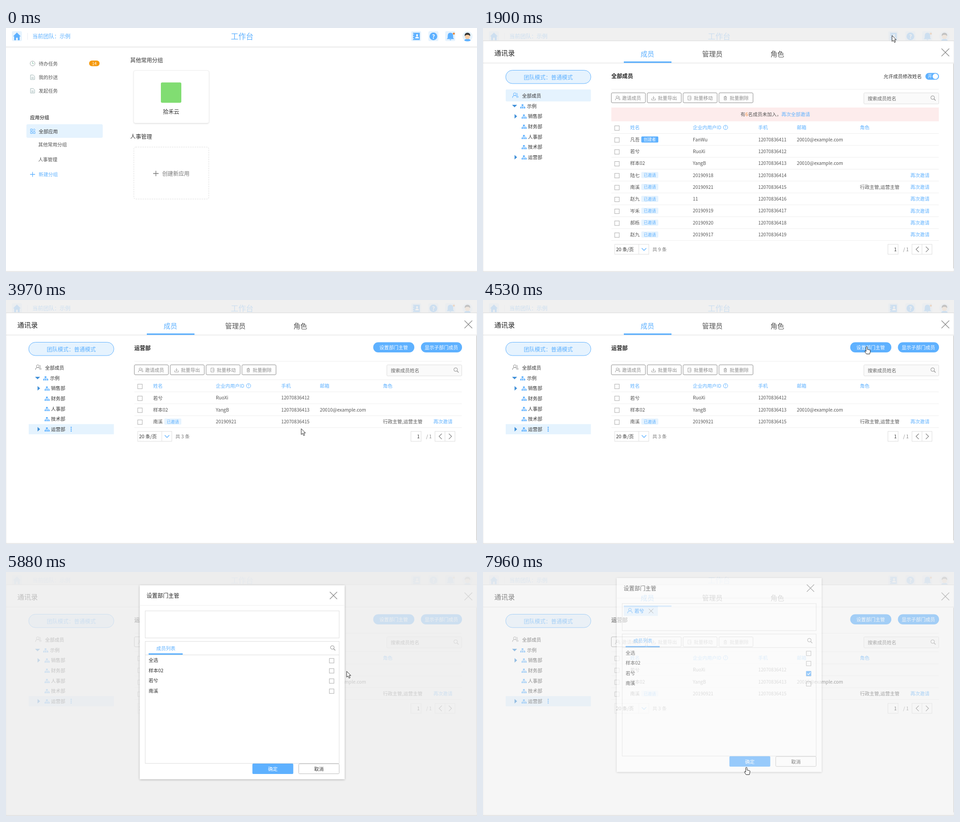
Animation of 1037x540 px, one loop 8 s. Source, as an HTML page:

```html
<!DOCTYPE html>
<html lang="zh-CN">
<head>
<meta charset="utf-8">
<style>
  html, body { margin: 0; width: 100%; height: 100%; overflow: hidden; background: #fff; }
  svg { display: block; font-family: "Noto Sans CJK SC", "Noto Sans CJK", "Noto Sans", sans-serif; }
</style>
</head>
<body>
<svg id="stage" width="1037" height="540" viewBox="0 0 1037 540"></svg>
<script>
const BLUE = '#5eb1ff', PALE = '#e6f3fe', GRAY = '#8c8c8c', LOOP = 8000;
const BOLD = 'font-weight="700"';
// The Japanese face centres the full-width colon.
const COLON = `<tspan font-family="'Noto Sans CJK JP', sans-serif">：</tspan>`;

// Drawing helpers; text is placed by its vertical centre.
const text = (x, cy, s, fill = '#555', size = 10.5, extra = '') =>
  `<text x="${x}" y="${cy + size * .37}" font-size="${size}" fill="${fill}" ${extra}>${s}</text>`;
const mid = (x, cy, s, fill, size) => text(x, cy, s, fill, size, 'text-anchor="middle"');
const rect = (x, y, w, h, fill = 'none', stroke = 'none', r = 0, extra = '') =>
  `<rect x="${x}" y="${y}" width="${w}" height="${h}" rx="${r}" fill="${fill}" stroke="${stroke}" ${extra}/>`;
const line = (d, stroke = '#eee', w = 1, fill = 'none') =>
  `<path d="${d}" stroke="${stroke}" stroke-width="${w}" fill="${fill}"/>`;
const shape = (d, fill = BLUE) => `<path d="${d}" fill="${fill}"/>`;
const circle = (x, y, r, fill = 'none', stroke = 'none') =>
  `<circle cx="${x}" cy="${y}" r="${r}" fill="${fill}" stroke="${stroke}"/>`;
const group = (id, body, extra = '') => `<g id="${id}" ${extra}>${body}</g>`;
const at = (x, y, scale, body) => `<g transform="translate(${x} ${y}) scale(${scale})">${body}</g>`;

// Icons
const cross = (x, y, r, c = GRAY, w = 1.4) =>
  line(`M${x - r} ${y - r}l${2 * r} ${2 * r}m0 ${-2 * r}l${-2 * r} ${2 * r}`, c, w);
const plus = (x, y, r, c) => line(`M${x - r} ${y}h${2 * r}m${-r} ${-r}v${2 * r}`, c, 1.3);
const lens = (x, y) => circle(x - 1, y - 1, 4, 'none', GRAY) + line(`M${x + 2} ${y + 2}l3.5 3.5`, GRAY, 1.2);
const box = (x, y) => rect(x - 5, y - 5, 10, 10, '#fff', '#aaa');
const person = (x, y, c) => circle(x, y - 2.5, 3, 'none', c) + line(`M${x - 5} ${y + 5.5}q0-5 5-5t5 5`, c, 1.1);
const people = (x, y, c) => person(x - 1, y, c) + line(`M${x + 3} ${y - 5}q3.5 2 .5 5q3 1 3 5`, c);
const org = (x, y) => shape(`M${x - 2} ${y - 4}h4v3h-4zM${x - 5} ${y + 2}h3v3h-3zm4 0h3v3h-3zm4 0h3v3h-3z`) +
  line(`M${x} ${y - 1}v3M${x - 3.5} ${y + 2}v-1.5h8v1.5`, BLUE, .8);

function homePage() {
  const tile = x => rect(x, 7, 22, 22, PALE, 'none', 3);
  const header = rect(0, 0, 1037, 41, '#fff') + rect(0, 41, 1037, 1, '#e6e6e6') + rect(0, 42, 1037, 2, '#f4f4f4') +
    tile(13) + shape('M24 10L32.5 18.5H30V27H26V21.5H22V27H18V18.5H15.5Z') +
    line('M47.5 11v15', '#e9eef3') + text(58, 19, `当前团队${COLON}示例`, BLUE, 12) + mid(520, 19, '工作台', BLUE, 16.6) +
    tile(892) + rect(896, 10.5, 15, 16, BLUE) + line('M894.5 13.5h4m-4 5h4m-4 5h4', PALE, 1.5) +
    circle(905, 16, 2.2, '#fff') + shape('M901 23q0-4 4-4t4 4z', '#fff') +
    tile(930) + circle(941, 18.5, 8.5, BLUE) + text(941, 18.8, '?', '#fff', 13, `text-anchor="middle" ${BOLD}`) +
    tile(967) + shape('M978.5 10.5q6 0 6 7v4l2 3h-16l2-3v-4q0-7 6-7zm-2 15h4q-2 3-4 0z') + circle(986, 12.5, 2.3, '#e8873a') +
    circle(1016, 18.5, 11, PALE) + shape('M1009 28q1-4 7-4t7 4q-7 3-14 0z') + circle(1016, 19, 5.5, '#f8cfa8') +
    shape('M1010 18q-1-7 6-7.5q7 .5 6 7.5q-2-3-6-3t-6 3z', '#333');
  const doc = y => line(`M55 ${y - 5}h5l3 3v7h-9v-10zm1 5h5m-5 2.5h5`, '#9db4b4');
  const side = circle(58.5, 78.5, 5.3, 'none', '#9aa5a5') + line('M58.5 75v4h3', '#7cbf9e') + doc(109) + doc(139) +
    text(72, 79, '待办任务') + text(72, 109, '我的抄送') + text(72, 139, '发起任务') +
    rect(183, 72, 23, 12.5, '#f59a0f', 'none', 6) + mid(194.5, 78.5, '14', '#fff', 9) +
    text(53, 198, '应用分组', '#555', 10.5, BOLD) + rect(45, 213, 168, 30, '#e5f3fe', 'none', 3) +
    line('M54 223.5h4v4h-4zm0 6h4v4h-4zm6 0h4v4h-4zm2-6.5l2.5 2.5l-2.5 2.5l-2.5-2.5z', BLUE) +
    text(72, 229, '全部应用', '#333') + text(71, 258, '其他常用分组') + text(71, 291, '人事管理') +
    plus(58.5, 324, 5.5, BLUE) + text(72, 324, '新建分组', BLUE);
  const main = text(273.5, 72, '其他常用分组', '#333', 12) +
    rect(281, 94, 166, 116.5, '#fff', '#ececec', 4, 'filter="url(#soft)"') +
    rect(341, 120.5, 45, 45, '#81dd72', 'none', 3) + mid(363.5, 186, '拾禾云', '#333', 12) +
    text(273.5, 241, '人事管理', '#333', 12) +
    rect(281.5, 263.5, 165, 115, 'none', '#ddd', 4, 'stroke-dasharray="3 2"') +
    plus(330, 322, 6, '#777') + text(344, 322.5, '创建新应用', '#777', 12);
  return rect(0, 0, 1037, 540, '#fff') + header + side + main;
}

// Member fields: name, tag, id, phone, mail, role
const MAIL = '20010@example.com';
const members = [
  ['凡吾', '创建者', 'FanWu', '12070836411', MAIL],
  ['若兮', '', 'RuoXi', '12070836412'],
  ['样本02', '', 'YangB', '12070836413', MAIL],
  ['陆七', '已邀请', '20190918', '12070836414'],
  ['南溪', '已邀请', '20190921', '12070836415', '', '行政主管,运营主管'],
  ['赵九', '已邀请', '11', '12070836416'],
  ['岑禾', '已邀请', '20190919', '12070836417'],
  ['郝栎', '已邀请', '20190920', '12070836418'],
  ['赵九', '已邀请', '20190917', '12070836419'],
];

function table(list, headY) {
  const rowY = i => headY + 26.4 + 26.3 * i;
  const rule = y => line(`M282.5 ${y}h721`);
  let out = box(295, headY + 1) + rule(headY + 13) + circle(534, headY - .5, 4.8, 'none', BLUE) + mid(534, headY - .5, '?', BLUE, 8) +
    [[324, '姓名'], [462, '企业内用户ID'], [606, '手机'], [691, '邮箱'], [830, '角色']]
      .map(([x, s]) => text(x, headY, s, BLUE)).join('');
  list.forEach(([name, tag, id, phone, mail = '', role = ''], i) => {
    const y = rowY(i), invited = tag === '已邀请';
    out += box(295, y + 1) + rule(y + 13) + text(324, y, name) + text(462, y, id, '#555', 10.2) +
      text(606, y, phone, '#555', 10.2) + text(691, y, mail, '#555', 10.2) + text(830, y, role);
    if (tag) out += rect(348.5, y - 7, 37.5, 13.5, invited ? PALE : BLUE, 'none', 2) +
      mid(367.3, y, tag, invited ? BLUE : '#fff', 9);
    if (invited) out += text(941, y, '再次邀请', BLUE);
  });
  const y = rowY(list.length - 1) + 32.5;
  return out + rect(290, y - 11, 75, 22, '#fff', '#ddd') + line(`M343 ${y - 11}v22`, '#ddd') +
    text(293, y, '20 条/页', '#333') + line(`M349.5 ${y - 2.5}l5 5l5-5`, BLUE, 1.3) + text(373, y, `共 ${list.length} 条`, '#777') +
    rect(891.5, y - 11, 22.5, 22, '#fff', '#ddd') + text(905, y, '1', '#333') + text(925, y, '/ 1', '#888') +
    rect(944.5, y - 11, 44, 22, '#fff', '#ddd') + line(`M966.5 ${y - 11}v22`, '#ddd') +
    line(`M959.5 ${y - 6}l-6 6l6 6M975 ${y - 6}l6 6l-6 6`, '#777', 1.2);
}

const toggle = on => text(882, 107, '允许成员修改姓名', '#333') + rect(974, 99.5, 30, 15, on ? BLUE : '#909090', 'none', 7.5) +
  circle(on ? 996 : 981.5, 107, 6, '#fff') + mid(on ? 984 : 994, 107, on ? '开' : '关', '#fff', 9);
const title = s => text(282.5, 107, s, '#222', 12, BOLD);
const pill = (x, s) => rect(x, 93.5, 90.5, 22.5, BLUE, 'none', 11) + mid(x + 45, 105, s, '#fff', 10.5);

function contacts() {
  const icons = [
    people(0, 0, GRAY), line('M0-5v7m-3-3l3 3l3-3M-5 1v4h10v-4', GRAY),
    line('M4-2v-3h-8v10h8v-3M-1 0h6m-2-2l2 2l-2 2', GRAY), line('M-4-3h8m-5 0v-2h2v2m-4 0v8h6v-8m-4 2v4m2-4v4', GRAY),
  ];
  const tools = ['邀请成员', '批量导出', '批量移动', '批量删除'].map((s, i) => {
    const x = 282.5 + 79 * i;
    return rect(x, 143.5, 75, 22, '#fff', GRAY, 2.5) + at(x + 14, 155, .85, icons[i]) + text(x + 23.5, 155, s, GRAY);
  }).join('');
  const tree = ['销售部', '财务部', '人事部', '技术部', '运营部'].map((s, i) => {
    const y = 195.5 + 22.6 * i;
    return (i % 4 ? '' : shape(`M69.5 ${y - 5}l5.5 5l-5.5 5z`, '#3f8fd8')) + org(90, y) + text(99, y, s, '#333');
  }).join('');
  return rect(0, 28.5, 1037, 512, '#fff', '#ddd', 0, 'filter="url(#soft)"') + line('M0 77.5h1037', '#ddd') +
    rect(1035.5, 79, 1.5, 453, '#ccc') + text(25, 55, '通讯录', '#222', 15) + mid(362, 57, '成员', BLUE, 15) +
    mid(505, 57, '管理员', '#555', 15) + mid(648, 57, '角色', '#555', 15) + rect(310, 74, 105, 3.2, BLUE) + cross(1018, 54, 8.5) +
    rect(50, 93.5, 187.5, 29.5, PALE, BLUE, 14.7) + mid(143.7, 110, `团队模式${COLON}普通模式`, BLUE, 12) +
    group('rootRow', rect(50, 136, 187.5, 26.5, '#e5f3fe', 'none', 2) + people(71, 149, BLUE)) +
    group('rootIdle', people(71, 149, GRAY)) + text(86, 150.5, '全部成员', '#333') +
    group('tree', group('treeHover', rect(50, 0, 187.5, 22.5)) +
      shape('M64 170h11l-5.5 5.5z', '#3f8fd8') + org(87, 173) + text(97, 173, '示例', '#333') + tree) +
    group('dots', [-4, 0, 4].map(d => circle(143.5, 286 + d, 1.4, 'inherit')).join('')) +
    line('M282.5 135.5h721m-721 41h721') + tools + rect(838.5, 143.5, 165, 24.5, '#fafafa', '#ddd', 2) +
    text(847, 156, '搜索成员姓名', '#666') + lens(991, 155) +
    group('loading', title('全部成员') + toggle(false)) +
    group('everyone', title('全部成员') + toggle(true) + rect(282.5, 176, 721, 30.5, '#fdecec') +
      mid(643.5, 191.5, `有<tspan fill="#f08c3a">6</tspan>名成员未加入，<tspan fill="${BLUE}">再次全部邀请</tspan>`, '#555', 10.5) +
      table(members, 220.5)) +
    group('department', title('运营部') + pill(808.5, '设置部门主管') + pill(913.5, '显示子部门成员') +
      table([members[1], members[2], members[4]], 190.3));
}

const optionY = i => 195.8 + 22.5 * i;

function dialog() {
  const options = ['全选', '样本02', '若兮', '南溪'].map((s, i) =>
    text(314, optionY(i) - .5, s, '#333') + box(717, optionY(i) + .5)).join('');
  return rect(294.5, 29.5, 451, 429, '#fff', 'none', 0, 'filter="url(#deep)"') +
    text(309.5, 52.5, '设置部门主管', '#222', 12) + cross(721, 52, 8) + line('M295 74h450', '#eee') +
    rect(306.5, 86, 427, 60, '#fff', '#ddd') + rect(306.5, 153.5, 427, 270, '#fff', '#ddd') +
    mid(352, 168.8, '成员列表', BLUE, 10.5) + rect(314, 180, 75, 3, BLUE) + lens(719.5, 168) + line('M307 183.5h426', '#ddd') +
    group('optionHover', rect(307, 0, 426, 22.5, '#eceeee')) + options +
    group('picked', rect(310, 91.5, 75, 22, PALE) + person(323.5, 102, BLUE) + text(333.5, 102.5, '若兮', BLUE, 10.5, BOLD) +
      cross(370, 102.5, 5, GRAY, 1) + rect(711.5, 235.5, 11, 11, BLUE, 'none', 1) + line('M714 241l2.5 2.5l4.5-5', '#fff', 1.4)) +
    rect(542.5, 424, 90, 23, BLUE, 'none', 2) + mid(587.5, 436.3, '确定', '#fff', 10.5) +
    rect(644.5, 424.5, 89, 22, '#fff', '#bbb', 2) + mid(689, 436.3, '取消', '#333', 10.5);
}

const shadow = (id, dy, blur, a) =>
  `<filter id="${id}"><feDropShadow dx="0" dy="${dy}" stdDeviation="${blur}" flood-opacity="${a}"/></filter>`;
const veil = id => group(id, rect(0, 0, 1037, 540, '#ececec'));

document.getElementById('stage').innerHTML =
  `<defs>${shadow('soft', 1, 1.2, .13)}${shadow('deep', 1, 2, .3)}</defs>` +
  homePage() + veil('pageVeil') + group('panel', contacts()) + veil('panelVeil') + group('modal', dialog()) +
  rect(0, 538, 1037, 1.3, '#dcdcdc') +
  group('cursor',
    group('arrow', line('M0 0V13L3 10.3L5.3 15.2L7.6 14.2L5.3 9.4H9.3Z', '#222', 1, '#fff')) +
    group('hand', line('M-1.6 1.2Q0-.8 1.4 1.2V6.5L4 6.8L7.4 8Q8.2 8.5 7.8 10L6.5 16.5H-.8L-4 11.5Q-4.8 9.8-3.4 9.2L-1.6 11Z', '#222', 1, '#fff')));

const el = id => document.getElementById(id);
const show = (id, on) => el(id).style.display = on ? '' : 'none';
const shift = (id, x, y) => el(id).setAttribute('transform', `translate(${x} ${y})`);
const easeOut = (t, start, length) => 1 - (1 - Math.min(1, Math.max(0, (t - start) / length))) ** 2;

// Pointer moves: start, end, control point, destination
const moves = [
  [60, 860, 740, 190, 902, 16],
  [1900, 2850, 480, 240, 94, 290],
  [3730, 4530, 808, 379, 845, 103],
  [5240, 6440, 800, 200, 716, 239],
  [7000, 7800, 640, 510, 580, 432],
];

function pointer(t) {
  let x = 560, y = 480;
  for (const [start, end, cx, cy, tx, ty] of moves) {
    if (t < start) break;
    const u = easeOut(t, start, end - start), v = 1 - u;
    x = v * v * x + 2 * u * v * cx + u * u * tx;
    y = v * v * y + 2 * u * v * cy + u * u * ty;
  }
  return [x, y];
}

function draw(t) {
  const [x, y] = pointer(t);
  const inside = (x0, y0, x1, y1) => x >= x0 && x <= x1 && y >= y0 && y <= y1;
  const rise = easeOut(t, 934, 510);
  const open = easeOut(t, 4740, 340) - easeOut(t, 7878, 380);
  const loaded = t >= 1420, chosen = t >= 3330, modal = open > 0;

  el('pageVeil').style.opacity = .78 * rise;
  shift('panel', 0, loaded ? 0 : 510 * (1 - rise));
  show('panel', rise > 0);
  show('loading', !loaded);
  show('tree', loaded);
  show('everyone', loaded && !chosen);
  show('department', chosen);
  show('rootRow', !chosen);
  show('rootIdle', chosen);

  const overTree = loaded && !modal && inside(50, 162, 237, 297);
  const treeRow = chosen ? 5 : Math.min(5, Math.floor((y - 162) / 22.6));
  show('treeHover', overTree || chosen);
  shift('treeHover', 0, 161.7 + 22.6 * treeRow);
  el('treeHover').firstChild.setAttribute('fill', chosen ? '#e5f3fe' : '#f1f1f1');
  show('dots', chosen || (overTree && treeRow === 5));
  el('dots').setAttribute('fill', chosen ? BLUE : GRAY);

  el('panelVeil').style.opacity = .78 * open;
  el('modal').style.opacity = open;
  show('modal', modal);
  shift('modal', 0, -43 * (1 - open));
  const overOption = modal && inside(307, 184, 733, 274);
  show('optionHover', overOption);
  shift('optionHover', 0, optionY(Math.min(3, Math.floor((y - 184) / 22.5))) - 11);
  show('picked', t >= 7000);

  const hand = overTree || (overOption && x > 708) || (modal && inside(542, 405, 633, 447)) ||
    (!rise && inside(892, 7, 914, 29)) || (chosen && !modal && inside(808, 93, 899, 116));
  show('cursor', t >= 60);
  show('hand', hand);
  show('arrow', !hand);
  shift('cursor', x, y);
}

const STEP = 79.7;
const stepped = t => Math.floor((t + 20) / STEP) * STEP - 12;

const begin = performance.now();
(function tick() {
  draw(stepped((performance.now() - begin) % LOOP));
  requestAnimationFrame(tick);
})();
</script>
</body>
</html>
```
